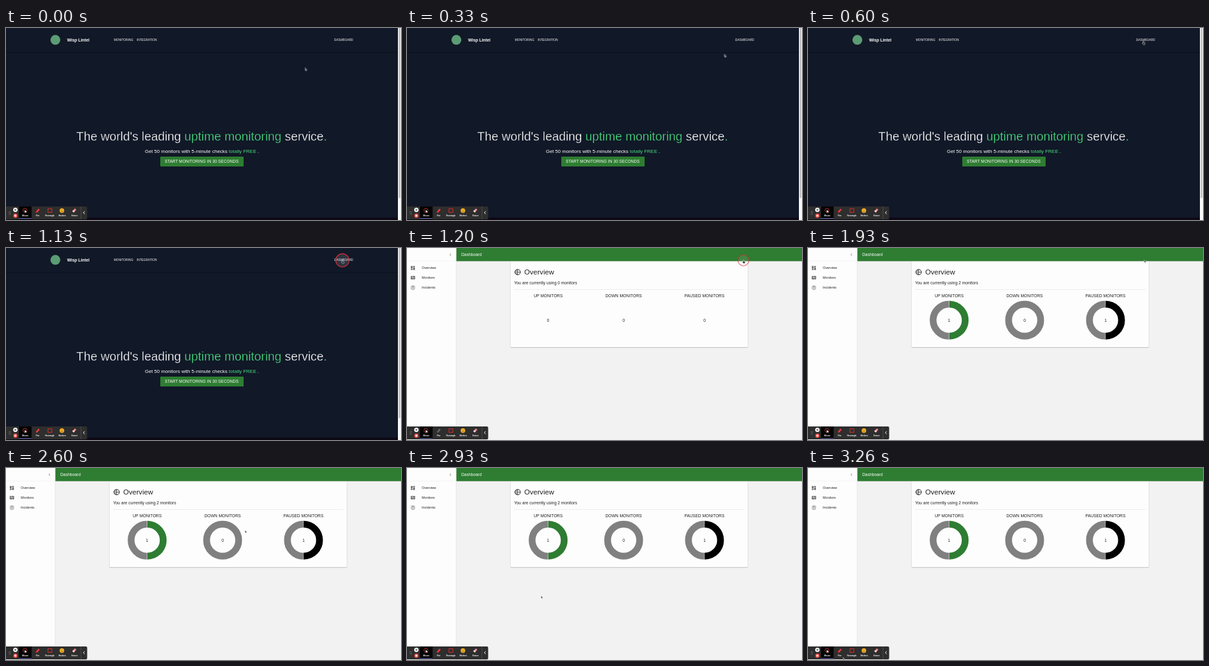
These frames come from a looping animation (640x312 px, 3.33 s). An HTML page:

```html
<!DOCTYPE html>
<html lang="en">
<head>
<meta charset="utf-8">
<title>Uptime monitoring demo</title>
<style>
  html, body { margin: 0; width: 100%; height: 100%; overflow: hidden; background: #111827; }
  svg { display: block; width: 100vw; height: 100vh; }
  text { font-family: "Liberation Sans", Arial, sans-serif; }
  .mid { text-anchor: middle; }
  .bold { font-weight: 700; }

  /* One loop is 3330 ms: page switch at 1200, data at 1260 */
  .landing, .app, .empty, .loaded, .arrow, .hand { animation: 3330ms step-end infinite; }
  .landing { animation-name: until-switch; }
  .app { animation-name: from-switch; }
  .empty { animation-name: until-data; }
  .loaded { animation-name: from-data; }
  .arrow { animation-name: arrow; }
  .hand { animation-name: hand; }
  @keyframes until-switch { 0% { opacity: 1 } 35.9%, 100% { opacity: 0 } }
  @keyframes from-switch { 0% { opacity: 0 } 35.9%, 100% { opacity: 1 } }
  @keyframes until-data { 0% { opacity: 1 } 37.8%, 100% { opacity: 0 } }
  @keyframes from-data { 0% { opacity: 0 } 37.8%, 100% { opacity: 1 } }
  @keyframes arrow { 0% { opacity: 1 } 17.4% { opacity: 0 } 37.8%, 100% { opacity: 1 } }
  @keyframes hand { 0% { opacity: 0 } 17.4% { opacity: 1 } 37.8%, 100% { opacity: 0 } }

  .pointer { animation: travel 3330ms linear infinite; }
  @keyframes travel {
    0%, 1.7% { transform: translate(484.5px, 64.5px); animation-timing-function: ease-in-out }
    18% { transform: translate(543px, 21.5px); animation-timing-function: ease-out }
    29%, 62% { transform: translate(544.7px, 19.5px); animation-timing-function: ease-in }
    78.1% { transform: translate(387.3px, 101px); animation-timing-function: ease-in-out }
    97.6%, 100% { transform: translate(57px, 308px) }
  }

  .press { transform-origin: 545px 20px; animation: press 3330ms linear infinite; }
  @keyframes press {
    0%, 30% { opacity: 0; transform: scale(1.06) }
    31.6% { opacity: 1; transform: scale(1.06) }
    33.9% { opacity: 1; transform: none }
    36% { opacity: .75; transform: scale(.82) }
    40%, 100% { opacity: 0; transform: scale(.5) }
  }

  .slice { fill: none; stroke-width: 11; animation: sweep 3330ms infinite; }
  @keyframes sweep {
    0%, 37.8% { stroke-dasharray: 0 100; animation-timing-function: ease-out }
    50.5%, 100% { stroke-dasharray: var(--share) 100 }
  }

  .pen { animation: pen 3330ms step-end infinite; }
  @keyframes pen { 0% { fill: #ef3b3b } 35.9% { fill: #666 } 37.8%, 100% { fill: #ef3b3b } }
</style>
</head>
<body>
<svg viewBox="0 0 640 312" preserveAspectRatio="none">
  <g class="landing">
    <rect width="640" height="312" fill="#111827"/>
    <path d="M0 39.5H635" stroke="#0a101b"/>
    <rect y="308" width="635" height="4" fill="#0d0915"/>
    <rect x="635" width="5" height="312" fill="#f8f8f8"/>
    <rect x="636.3" y="0" width="2.7" height="276.5" rx="1.3" fill="#c1c1c1"/>
    <circle cx="80" cy="19.3" r="8" fill="#5c9c74"/>
    <g fill="#fff">
      <text class="bold" x="99" y="21.5" font-size="6.8">Wisp Lintel</text>
      <g font-size="4.85">
        <text x="174.8" y="21.1">MONITORING</text>
        <text x="211.8" y="21.1">INTEGRATION</text>
        <text x="531.8" y="21.1">DASHBOARD</text>
      </g>
      <text x="113.8" y="182.8" font-size="19.8" stroke="#111827" stroke-width=".3">The world's leading <tspan fill="#4ade80">uptime monitoring</tspan> service<tspan fill="#4ade80">.</tspan></text>
      <text x="225" y="203.4" font-size="8">Get 50 monitors with 5-minute checks <tspan fill="#4ade80">totally FREE</tspan> .</text>
      <rect x="250" y="209" width="135" height="16" rx="1" fill="#2e7d32"/>
      <text x="257.2" y="219.2" font-size="6.5" letter-spacing=".13">START MONITORING IN 30 SECONDS</text>
    </g>
  </g>

  <g class="app">
    <rect width="640" height="312" fill="#f2f2f2"/>
    <rect x="168" y="22.5" width="384" height="140" rx="1" fill="#000" opacity=".08"/>
    <rect x="167.5" y="22" width="385" height="139.8" rx="1" fill="#000" opacity=".14"/>
    <rect x="168" y="20" width="384" height="141" rx="1" fill="#fdfdfd"/>
    <rect x="80" y="21" width="560" height="1" fill="#000" opacity=".14"/>
    <rect x="80" width="560" height="21.3" fill="#2e7d32"/>
    <text x="88" y="13" font-size="6.6" letter-spacing=".07" fill="#fff">Dashboard</text>

    <rect width="79.5" height="312" fill="#fdfdfd"/>
    <path d="M79.7 0V312" stroke="#dedede" stroke-width=".6"/>
    <path d="M0 21.3H79.5" stroke="#e8e8e8" stroke-width=".5"/>
    <path d="M71.3 9L69.4 10.8L71.3 12.6" fill="none" stroke="#666" stroke-width=".8"/>
    <g fill="#707070">
      <path d="M6.2 29.2h2.9v3.7h-2.9zM9.9 29.2h2.9v2.2h-2.9zM6.2 33.6h2.9v2.2h-2.9zM9.9 32.1h2.9v3.7h-2.9z"/>
      <rect x="6" y="45.4" width="7.2" height="5.6" rx=".7"/>
      <path d="M6.8 48.2H8.3L9 46.7L10.2 49.7L11 48.2H12.4" fill="none" stroke="#fff" stroke-width=".6"/>
    </g>
    <g fill="none" stroke="#707070" stroke-width=".7">
      <circle cx="9.6" cy="64.8" r="3"/>
      <circle cx="9.6" cy="64.8" r="1.2"/>
      <path d="M9.6 60.4V64M6.6 61.2L8 62.8M12.6 61.2L11.2 62.8"/>
    </g>
    <g font-size="5.5" fill="#222">
      <text x="24" y="34.1">Overview</text>
      <text x="24" y="50.1">Monitors</text>
      <text x="24" y="66.1">Incidents</text>
    </g>

    <g fill="none" stroke="#222">
      <circle cx="179.3" cy="39.2" r="4.4" stroke-width="1"/>
      <path d="M179 35V43.4M179.3 39.2H183.7" stroke-width=".9"/>
    </g>
    <path d="M178.7 34.8A4.4 4.4 0 0 0 178.7 43.6Z" fill="#222" opacity=".3"/>
    <g fill="#222">
      <text x="190" y="43.2" font-size="11.6">Overview</text>
      <g font-size="6.76">
        <text class="empty" x="173.4" y="59">You are currently using 0 monitors</text>
        <text class="loaded" x="173.4" y="59">You are currently using 2 monitors</text>
      </g>
    </g>
    <path d="M173.5 67.5H546.5" stroke="#e4e4e4" stroke-width=".7"/>
    <g id="charts" font-size="6.7" fill="#222"></g>
  </g>

  <g class="toolbar">
    <path d="M0 290H129.5Q131.5 290 131.5 292V309Q131.5 311 129.5 311H0Z" fill="#2e2e2e"/>
    <rect x="21" y="290" width="20.5" height="21" fill="#050505"/>
    <path d="M21 309.6H41.5" stroke="#8c8cf0" stroke-width=".9"/>
    <path d="M121.5 290V311" stroke="#555" stroke-width=".7"/>
    <path d="M5.2 298V304M7.2 298V304" stroke="#aaa" stroke-width=".8" stroke-dasharray=".9 1.3"/>
    <circle cx="15.2" cy="295.5" r="3.5" fill="#fff"/>
    <path d="M14.5 294V297M16 294V297" stroke="#222" stroke-width=".8"/>
    <circle cx="15.2" cy="305" r="3.4" fill="#ef4a45"/>
    <rect x="13.8" y="303.6" width="2.8" height="2.8" fill="#fff"/>
    <circle cx="30.7" cy="296.3" r="3.2" fill="none" stroke="#d83a3a" stroke-width=".8"/>
    <path d="M30.5 295.3V300.3L31.8 299.2L34 299.4Z" fill="#fff"/>
    <path class="pen" d="M48.4 300.2L49 297.8L52.6 293.6L54.6 295.3L51 299.4Z"/>
    <rect x="68" y="293.8" width="6.2" height="5.8" fill="none" stroke="#e02e2e" stroke-width="1"/>
    <circle cx="90.6" cy="296.8" r="3.7" fill="#f7b52c"/>
    <path d="M89.3 295.2V296.2M91.9 295.2V296.2M88.7 297.8Q90.6 300 92.5 297.8" fill="none" stroke="#5b3710" stroke-width=".7"/>
    <path d="M107.4 297.8L111.5 293.3L114 295.3L109.8 299.8Z" fill="#f48a96"/>
    <path d="M107.4 297.8L109 296L111.5 298L109.8 299.8Z" fill="#f5dada"/>
    <path d="M127.4 297.8L125.4 300.1L127.4 302.4" fill="none" stroke="#fff" stroke-width="1"/>
    <g class="mid bold" font-size="3.15" fill="#fff">
      <text x="31.2" y="305.6">Mouse</text>
      <text x="51.3" y="305.6">Pen</text>
      <text x="71.1" y="305.6">Rectangle</text>
      <text x="91.1" y="305.6">Stickers</text>
      <text x="111.2" y="305.6">Eraser</text>
    </g>
  </g>

  <circle class="press" cx="545" cy="20" r="10.8" fill="#fff" fill-opacity=".12" stroke="#d32f3a" stroke-width="1.4"/>
  <g class="pointer" fill="#111" stroke="#fff" stroke-width=".6" stroke-linejoin="round">
    <path class="arrow" d="M0 0V4.3L1 3.5L1.7 5L2.5 4.6L1.8 3.2H3.1Z"/>
    <path class="hand" d="M-.2 .3Q.4 -.4 .9 .3V2L2.9 2.5Q3.4 3.7 2.6 5.4H.2L-1.5 3.3L-1 2.7L-.2 3.2Z"/>
  </g>
</svg>
<script>
  const green = "#2e7d32", grey = "#808080", black = "#000";
  const monitors = [
    { label: "UP MONITORS", x: 228.7, count: 1, color: green },
    { label: "DOWN MONITORS", x: 351, count: 0 },
    { label: "PAUSED MONITORS", x: 482, count: 1, color: black },
  ];

  const label = (x, y, text, cls = "") =>
    `<text class="mid ${cls}" x="${x}" y="${y}">${text}</text>`;

  const slice = (x, color, share, angle) =>
    `<circle class="slice" cx="${x}" cy="117.3" r="26" pathLength="100" stroke="${color}"
      style="--share:${share}" transform="rotate(${angle} ${x} 117.3)"/>`;

  const chart = ({ label: name, x, count, color }) =>
    label(x, 80.4, name) +
    (color ? slice(x, color, 49.7, -89.5) + slice(x, grey, 49.7, 90.5) : slice(x, grey, 100, -90)) +
    label(x, 119.7, 0, "empty") +
    label(x, 119.7, count, "loaded");

  document.getElementById("charts").innerHTML = monitors.map(chart).join("");
</script>
</body>
</html>
```
